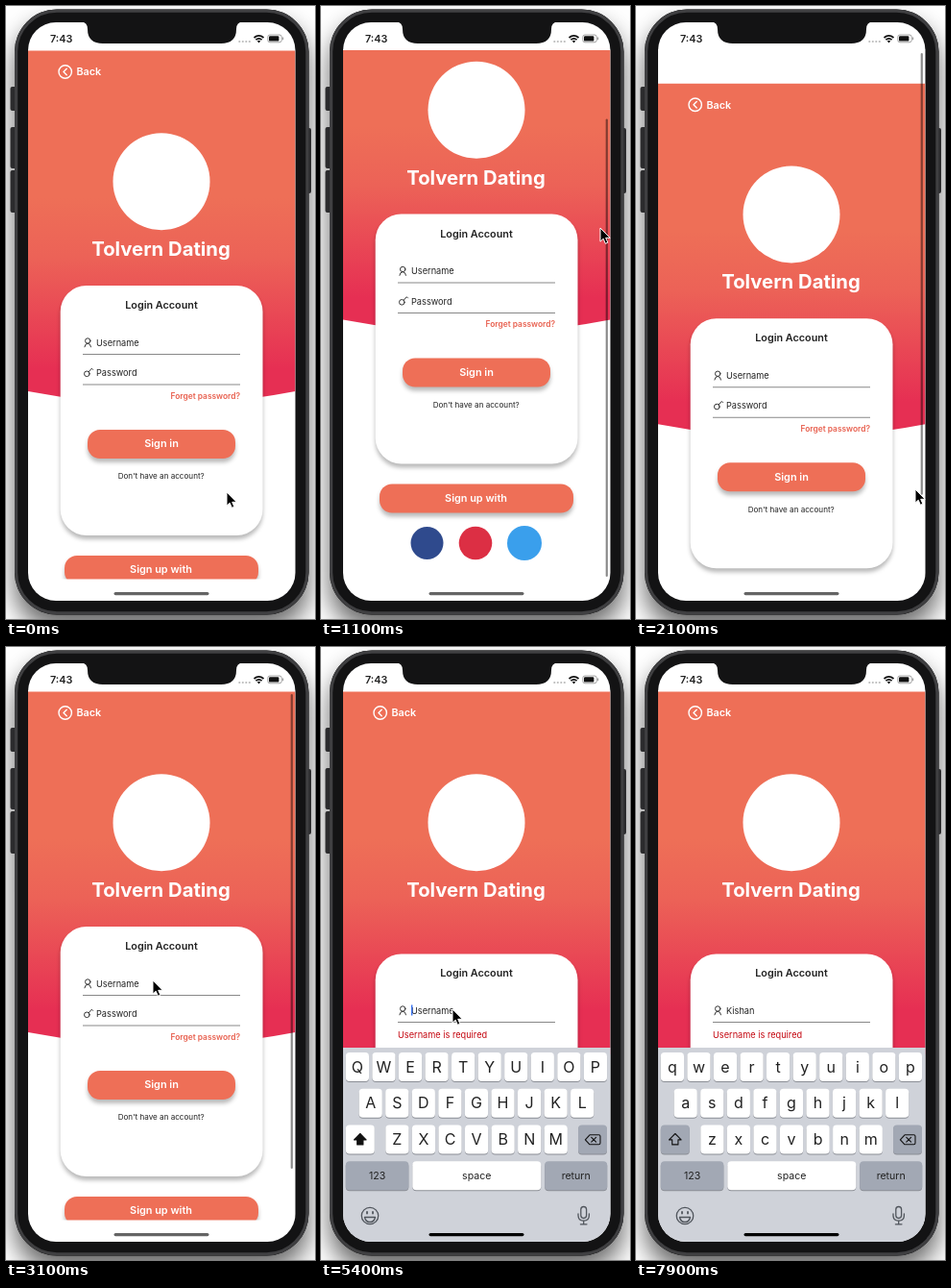
Write an HTML page that moves like this. It is 322 px wide and 638 px high and loops after 8 s.

```html
<!DOCTYPE html>
<html lang="en">
<head>
<meta charset="utf-8">
<title>Login screen</title>
<style>
  html, body { margin: 0; width: 100%; height: 100%; overflow: hidden; background: #fff; }
  svg { display: block; width: 322px; height: 638px; font-family: Inter, Roboto, sans-serif; }
  text { fill: #222; }
  .b { font-weight: 600; }
  .w { fill: #fff; }
  .mid { text-anchor: middle; }
  .line { fill: none; stroke: #333; stroke-width: 1; stroke-linecap: round; stroke-linejoin: round; }
  .field { font-size: 9.2px; }
  .err { font-size: 9.2px; fill: #c4060f; }
  .btn { fill: #ee6f57; }
  .btn, #card { filter: drop-shadow(0 4px 2px rgba(0,0,0,.27)); }
  #phone { filter: drop-shadow(0 15px 13px rgba(0,0,0,.6)); }
</style>
</head>
<body>
<svg viewBox="0 0 322 638">
  <defs>
    <linearGradient id="sky" gradientUnits="userSpaceOnUse" x1="0" y1="200" x2="0" y2="378">
      <stop stop-color="#ee6f57"/><stop offset=".35" stop-color="#ec6257"/><stop offset="1" stop-color="#e62f53"/>
    </linearGradient>
    <clipPath id="screen"><rect x="23" y="17" width="278.5" height="602" rx="29"/></clipPath>
    <clipPath id="view"><rect x="23" y="46" width="278.5" height="550.5"/></clipPath>
  </defs>

  <rect width="322" height="638" fill="#fff"/>
  <rect id="phone" x="9" y="3.5" width="306.5" height="630" rx="44"/>
  <g fill="#2b2b2d">
    <rect x="4.5" y="84" width="8" height="25" rx="2"/>
    <rect x="4.5" y="126" width="8" height="43" rx="2"/>
    <rect x="4.5" y="171" width="8" height="44" rx="2"/>
    <rect x="311" y="127" width="7" height="68" rx="2"/>
  </g>
  <rect x="10.6" y="5.1" width="303.3" height="626.8" rx="42.4" fill="#131314" stroke="#3f3f41" stroke-width="3.2"/>
  <rect x="23" y="17" width="278.5" height="602" rx="29" fill="#fff"/>

  <g clip-path="url(#view)">
    <g id="page">
      <path id="header" fill="url(#sky)"/>
      <g class="line" style="stroke:#fff;stroke-width:1.4">
        <circle cx="61.7" cy="68.5" r="6.7"/><path d="M63.2 65.2l-3.2 3.3 3.2 3.3"/>
      </g>
      <text class="b w" x="73.5" y="72.3" font-size="10.8">Back</text>
      <circle cx="162" cy="182.7" r="50.5" fill="#fff"/>
      <text class="w mid" x="161.5" y="260" font-size="20.3" font-weight="700">Tolvern Dating</text>

      <rect id="card" x="56.7" width="210.8" rx="27" fill="#fff"/>
      <g data-drop="28">
        <text class="b mid" x="162" y="315" font-size="10.8">Login Account</text>
        <g class="line">
          <circle cx="85.2" cy="348.5" r="2.7"/><path d="M81.9 354.8q.4-3.4 3.3-3.6 2.9.2 3.3 3.6"/>
        </g>
        <text id="user" class="field" x="94" y="353.8">Username</text>
        <path id="caret" d="M94.7 344.5v11" stroke="#3b74f0" stroke-width="1.4"/>
        <path d="M80 362.5h164" stroke="#888"/>
        <text class="err" x="80" y="378.8">Username is required</text>
      </g>
      <g data-drop="46.5">
        <g class="line">
          <circle cx="84.3" cy="382.8" r="2.8"/><path d="M86.3 380.6l3-3.4 1.2 1.2"/>
        </g>
        <text class="field" x="94" y="385">Password</text>
        <path d="M80 394h164" stroke="#888"/>
        <text class="err" x="80" y="410">Password is required</text>
      </g>
      <text class="b" data-drop="64.5" x="244" y="408.8" text-anchor="end" font-size="8.4" style="fill:#e8604f">Forget password?</text>
      <g data-drop="64.5">
        <g id="signin">
          <rect class="btn" x="85" y="441" width="154" height="30" rx="13"/>
          <text class="b w mid" x="162" y="459.4" font-size="10.9">Sign in</text>
        </g>
        <text class="mid" x="161.7" y="492.3" font-size="8.1">Don't have an account?</text>
      </g>
      <g data-drop="92">
        <rect class="btn" x="61" y="572" width="202" height="30" rx="13"/>
        <text class="b w mid" x="161.5" y="590.4" font-size="10.9">Sign up with</text>
        <circle cx="110.5" cy="633.5" r="17" fill="#2f4a8d"/>
        <circle cx="161" cy="633.5" r="17.3" fill="#dc2f44"/>
        <circle cx="212" cy="633.5" r="18" fill="#3a9fec"/>
      </g>
    </g>
    <rect id="bar" x="296.7" width="2.2" rx="1.1" fill="#000" fill-opacity=".45"/>
  </g>

  <g clip-path="url(#screen)"><g id="keyboard"></g></g>

  <path d="M78 16q7 1 7 8q0 15 16 15h123q16 0 16-15q0-7 7-8z" fill="#131314"/>
  <text class="b" x="46" y="37.6" font-size="10.8">7:43</text>
  <g fill="#bbb">
    <circle cx="243.3" cy="37" r="1.1"/><circle cx="246.8" cy="37" r="1.1"/>
    <circle cx="250.3" cy="37" r="1.1"/><circle cx="253.8" cy="37" r="1.1"/>
  </g>
  <g class="line" style="stroke:#111;stroke-width:1.7;stroke-linecap:butt">
    <path d="M258.5 33q5-4.4 10 0M260.4 35.2q3.1-2.7 6.2 0"/>
  </g>
  <path d="M261.8 36.4q1.7-1.4 3.4 0l-1.7 2z" fill="#111"/>
  <rect x="272.8" y="30" width="14.4" height="7.8" rx="2.2" fill="none" stroke="#999" stroke-width=".9"/>
  <rect x="274" y="31.2" width="10.4" height="5.4" rx="1.2" fill="#111"/>
  <path d="M288.6 32.6v2.6" stroke="#999" stroke-width="1.1"/>
  <rect id="home" x="112.5" y="610" width="99" height="3.2" rx="1.6"/>

  <path id="mouse" d="M0 0V14.2L3.2 11.2 5.4 16.3 7.9 15.2 5.7 10.3H10.2Z" stroke="#fff" stroke-width="1"/>
</svg>

<script>
const $ = id => document.getElementById(id);
const LOOP = 8000, CLICK = 3600, FOCUS = 4650, MAX_SCROLL = 57, VIEW = 551;
const NAME = 'Kishan', TYPED = [6200, 6450, 6700, 6950, 7200, 7450];

// Each row: time, then the values reached at that time.
const MOUSE = [[50, 230, 506], [400, 294, 505], [815, 291, 231], [1400, 291, 231], [1900, 291, 503],
  [2300, 291, 503], [3000, 153, 347], [3200, 153, 347], [3550, 163, 458], [3950, 163, 458], [4500, 137, 377]];
const BAR = [[400, 0], [500, 1], [3200, 1], [3450, 0]];
const KEYS_UP = [[FOCUS, 0], [5050, 1]];
const FADE = [[CLICK, 1], [CLICK + 200, .35]];
// The pointer holds the page from start to end; base is the scroll offset when grabbed.
const DRAGS = [{ start: 400, end: 815, base: 0 }, { start: 1400, end: 1900, base: MAX_SCROLL }];

function at(track, t) {
  const i = track.findIndex(k => k[0] > t);
  if (i < 0) return track[track.length - 1].slice(1);
  if (!i) return track[0].slice(1);
  const a = track[i - 1], b = track[i], p = (t - a[0]) / (b[0] - a[0]), e = p * p * (3 - 2 * p);
  return a.slice(1).map((v, j) => v + (b[j + 1] - v) * e);
}

// Rubber-band pull past the ends while held, damped spring back after release.
function scrollAt(t) {
  const drag = DRAGS.filter(d => d.start <= t).pop();
  if (!drag) return 0;
  const raw = drag.base + at(MOUSE, drag.start)[1] - at(MOUSE, Math.min(t, drag.end))[1];
  const rest = Math.max(0, Math.min(raw, MAX_SCROLL)), over = raw - rest;
  const pull = over * .55 / (1 + Math.abs(over) * .55 / VIEW);
  const k = Math.max(0, t - drag.end) * .011;
  return rest + pull * (1 + k) * Math.exp(-k);
}

function key(x, y, w, label, size, dark, id = '') {
  return `<rect x="${x}" y="${y + 1}" width="${w}" height="30" rx="4" fill="#8b8e95"/>
    <rect id="${id}" x="${x}" y="${y}" width="${w}" height="30" rx="4" fill="${dark ? '#a2a8b4' : '#fff'}"/>
    <text class="mid${size > 12 ? ' letter' : ''}" x="${x + w / 2}" y="${y + 15 + size * .35}" font-size="${size}">${label}</text>`;
}

function buildKeyboard() {
  const rows = ['QWERTYUIOP', 'ASDFGHJKL', 'ZXCVBNM'];
  let out = '<rect x="23" y="417" width="279" height="203" fill="#cfd2d9"/>';
  rows.forEach((row, r) => [...row].forEach((c, i) => {
    out += key([25.8, 39.6, 67.3][r] + i * 27.56, 422 + r * 37.8, 24.2, c, 16);
  }));
  out += key(25.8, 497.6, 30, '', 10, true, 'shift') + key(268, 497.6, 30, '', 10, true)
    + key(25.8, 535.2, 65.5, '123', 10.6, true) + key(95.3, 535.2, 134, 'space', 10.6)
    + key(233.2, 535.2, 65, 'return', 10.6, true);
  out += `<g class="line" style="stroke:#111;stroke-width:1.1">
    <path id="arrow" d="M40.8 506.5l6.3 6.4h-3.2v5h-6.2v-5h-3.2z"/>
    <path d="M280 507.8h9.5q1.5 0 1.5 1.5v7q0 1.5-1.5 1.5H280l-4.6-5zM281.8 510.4l4.8 4.8M286.6 510.4l-4.8 4.8"/></g>
    <g class="line" style="stroke:#50555c;stroke-width:1.3">
    <circle cx="51" cy="592" r="8.7"/><path d="M45.5 593.5h11q-1 5-5.5 5t-5.5-5z"/>
    <path d="M48 588v1.6M54 588v1.6" stroke-width="1.8"/>
    <rect x="270.8" y="582.5" width="5.8" height="12" rx="2.9"/>
    <path d="M268 590v1.5q0 5.6 5.7 5.6t5.7-5.6V590M273.7 597.2v3.6M270.4 600.8h6.6"/></g>`;
  $('keyboard').innerHTML = out;
}
buildKeyboard();

const drops = document.querySelectorAll('[data-drop]');
const errors = document.querySelectorAll('.err');
const letters = document.querySelectorAll('.letter');
const set = (id, attrs) => { for (const k in attrs) $(id).setAttribute(k, attrs[k]); };

function drawForm(t) {
  const bad = t >= CLICK, edge = bad ? 424 : 401;
  set('header', { d: `M23 46.5H301.5V${edge}Q162 ${edge + 27} 23 ${edge}Z` });
  set('card', { y: bad ? 319.5 : 291, height: bad ? 323 : 260 });
  drops.forEach(el => el.setAttribute('transform', `translate(0 ${bad ? el.dataset.drop : 0})`));
  errors.forEach(el => el.style.display = bad ? '' : 'none');
  set('signin', { opacity: at(FADE, t)[0] });

  const count = TYPED.filter(k => k <= t).length, user = $('user');
  user.textContent = count ? NAME.slice(0, count) : 'Username';
  const caretX = count ? user.getComputedTextLength() + .8 : 0;
  set('caret', { transform: `translate(${caretX} 0)`, opacity: t > FOCUS && t % 1000 < 500 ? 1 : 0 });
}

function drawScroll(t) {
  const y = scrollAt(t);
  set('page', { transform: `translate(0 ${-y})` });
  const top = 49 + Math.max(0, Math.min(y, MAX_SCROLL)) * 51 / MAX_SCROLL + Math.max(0, y - MAX_SCROLL);
  const bottom = Math.min(594, 543 + (y < 0 ? y : y * 51 / MAX_SCROLL));
  set('bar', { y: top, height: bottom - top, opacity: at(BAR, t)[0] });
}

function drawKeyboard(t) {
  const up = at(KEYS_UP, t)[0], caps = t < TYPED[0];
  set('keyboard', { transform: `translate(0 ${203 * (1 - up)})` });
  letters.forEach(el => {
    const c = el.textContent;
    el.textContent = caps ? c.toUpperCase() : c.toLowerCase();
  });
  set('shift', { fill: caps ? '#fff' : '#a2a8b4' });
  set('arrow', { fill: caps ? '#111' : 'none' });
  set('home', { fill: up > .1 ? '#000' : '#646464' });
}

function frame(now) {
  const t = now % LOOP, [x, y] = at(MOUSE, t);
  drawForm(t);
  drawScroll(t);
  drawKeyboard(t);
  set('mouse', { transform: `translate(${x} ${y})`, opacity: t < TYPED[0] ? 1 : 0 });
  requestAnimationFrame(frame);
}
frame(0);
</script>
</body>
</html>
```
